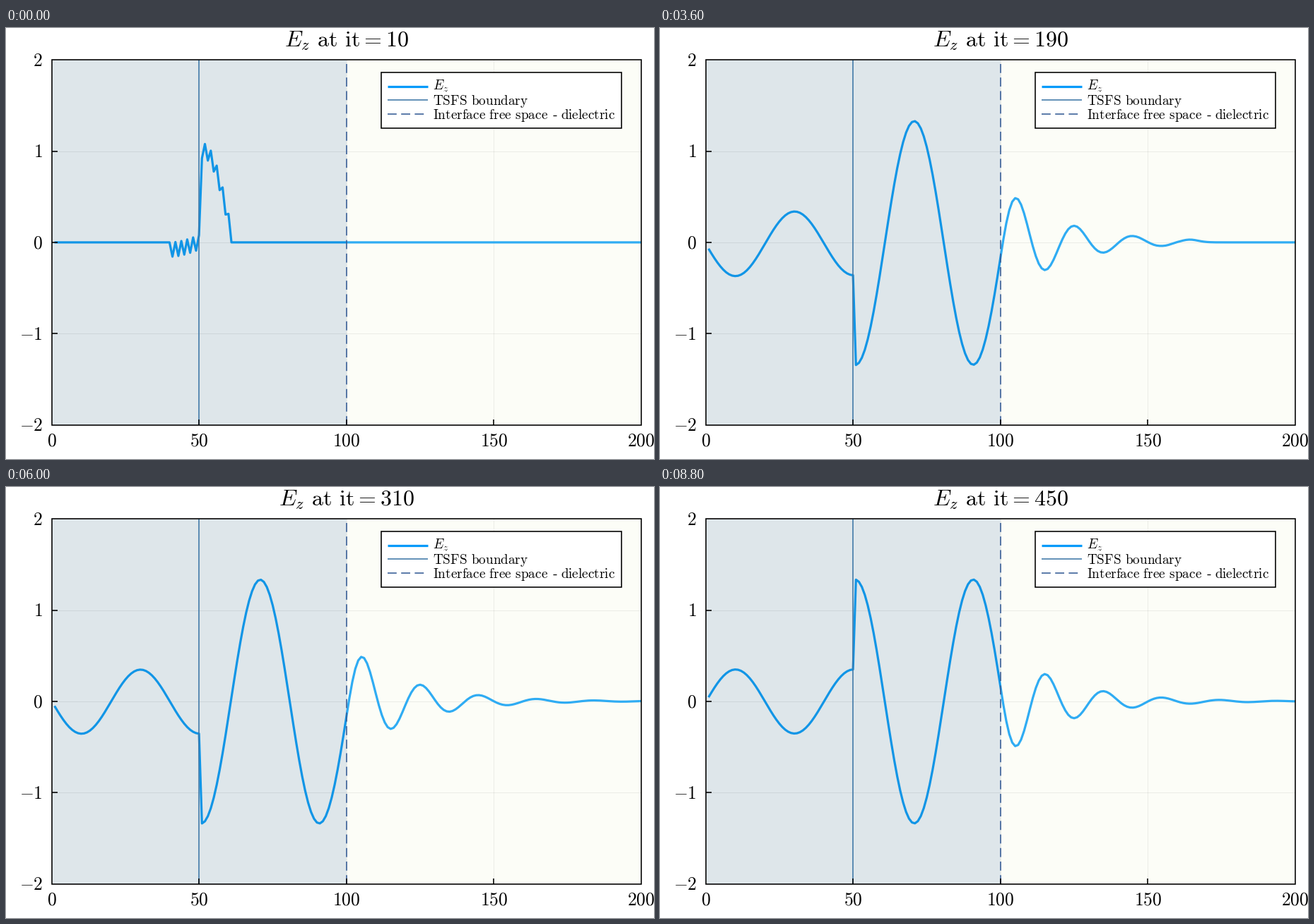
Write a matplotlib script that moves like this. It is 917 px wide and 611 px high and loops after 9 s.

```python
import numpy as np
import matplotlib as mpl
import matplotlib.pyplot as plt
from matplotlib.animation import FuncAnimation
from matplotlib.patches import Rectangle

mpl.rcParams["mathtext.fontset"] = "cm"

W, H, DPI = 917, 611, 64
LEFT, RIGHT, TOP, BOTTOM = 64.5, 899, 45.3, 562.5
FRAMES, STEP, INTERVAL = 45, 10, 200
CELLS, SOURCE, INTERFACE = 200, 50, 99   # zero-based cells
PERIOD, EPS, LOSS = 40, 4.0, 0.025
BLUE, STEEL, NAVY = "#009afa", "#3f79a8", "#355c96"
SPACE = r"\hspace{0.38}"


def simulate():
    """1D FDTD at Courant number 1; keeps E after every STEP updates."""
    e, h = np.zeros(CELLS), np.zeros(CELLS - 1)
    keep, gain = np.ones(CELLS), np.ones(CELLS)
    keep[INTERFACE:] = (1 - LOSS) / (1 + LOSS)
    gain[INTERFACE:] = 1 / EPS / (1 + LOSS)
    snaps = []
    for it in range(1, FRAMES * STEP + 1):
        wave = np.sin(2 * np.pi * it / PERIOD)
        h += e[1:] - e[:-1]
        h[SOURCE - 1] -= wave
        # absorbing ends
        e[0], e[-1] = e[1], e[-2]
        e[1:-1] = keep[1:-1] * e[1:-1] + gain[1:-1] * (h[1:] - h[:-1])
        e[SOURCE] += wave
        if it % STEP == 0:
            snaps.append(e.copy())
    return snaps


def px(v):
    return v * 72 / DPI


def sx(x):
    return LEFT + np.asarray(x) * (RIGHT - LEFT) / 200


def sy(y):
    return (TOP + BOTTOM) / 2 - np.asarray(y) * (BOTTOM - TOP) / 4


def roman(text):
    return r"$\mathrm{%s}$" % text.replace(" ", SPACE).replace("=", "{=}")


def title_text(it):
    return r"$E_z\mathrm{%sat%sit{=}%d}$" % (SPACE, SPACE, it)


fig = plt.figure(figsize=(W / DPI, H / DPI), dpi=DPI, facecolor="white")
ax = fig.add_axes([0, 0, 1, 1])
ax.set_xlim(0, W)
ax.set_ylim(H, 0)
ax.axis("off")


def line(xs, ys, color, width, z, **kw):
    kw.setdefault("solid_capstyle", "butt")
    return ax.plot(xs, ys, color=color, lw=px(width), zorder=z, **kw)[0]


def label(x, y, text, size, ha):
    return ax.text(x, y, text, fontsize=px(size), ha=ha, va="baseline",
                   color="black", zorder=9)


def box(x0, y0, x1, y1, z, **kw):
    ax.add_patch(Rectangle((x0, y0), x1 - x0, y1 - y0, zorder=z, **kw))


DASH = dict(dashes=(8, 4), dash_capstyle="butt")

# grid, ticks and tick labels
for v in (0, 50, 100, 150, 200):
    x = float(sx(v))
    if 0 < v < 200:
        line([x, x], [TOP, BOTTOM], "black", 0.8, 1, alpha=0.1)
        line([x, x], [BOTTOM, BOTTOM - 8], "black", 1.6, 6)
    label(x, 592.7, roman(str(v)), 25.6, "center")
for v in (-2, -1, 0, 1, 2):
    y = float(sy(v))
    if abs(v) < 2:
        line([LEFT, RIGHT], [y, y], "black", 0.8, 1, alpha=0.1)
        line([LEFT, LEFT + 8], [y, y], "black", 1.6, 6)
    label(52, y + 8.6, "$%d$" % v, 25.6, "right")

# the tinted media lie over the curve
curve = line([], [], BLUE, 3.2, 2)
middle = float(sx(100))
box(LEFT, TOP, middle, BOTTOM, 3, fc=(0.353, 0.51, 0.588), alpha=0.2, lw=0)
box(middle, TOP, RIGHT, BOTTOM, 3, fc=(0.941, 0.961, 0.843), alpha=0.2, lw=0)
line(sx([50, 50]), [BOTTOM, TOP], STEEL, 1.6, 4)
line([middle, middle], [BOTTOM, TOP], NAVY, 1.6, 4, **DASH)
box(LEFT, TOP, RIGHT, BOTTOM, 6, fc="none", ec="black", lw=px(1.6))

# legend
box(531, 62.7, 871, 142, 7, fc="white", ec="black", lw=px(1.6))
line([540, 597], [82.5, 82.5], BLUE, 3.2, 8)
line([540, 597], [102.4, 102.4], STEEL, 1.6, 8)
line([540, 597], [122.3, 122.3], NAVY, 1.6, 8, **DASH)
label(604.5, 87.7, "$E_z$", 19.2, "left")
label(604.5, 109.2, roman("TSFS boundary"), 19.2, "left")
label(604.5, 129, roman("Interface free space"), 19.2, "left")
line([773.5, 778.6], [124.4, 124.4], "black", 1.3, 9)
label(862, 129, roman("dielectric"), 19.2, "right")

title = label(481.8, 26.8, title_text(STEP), 32, "center")
fields = simulate()
cells = sx(np.arange(1, CELLS + 1))


def update(k):
    curve.set_data(cells, sy(fields[k]))
    title.set_text(title_text((k + 1) * STEP))
    return curve, title


anim = FuncAnimation(fig, update, frames=FRAMES, interval=INTERVAL,
                     init_func=lambda: update(0), repeat=True,
                     repeat_delay=0, blit=False)
plt.show()
```
